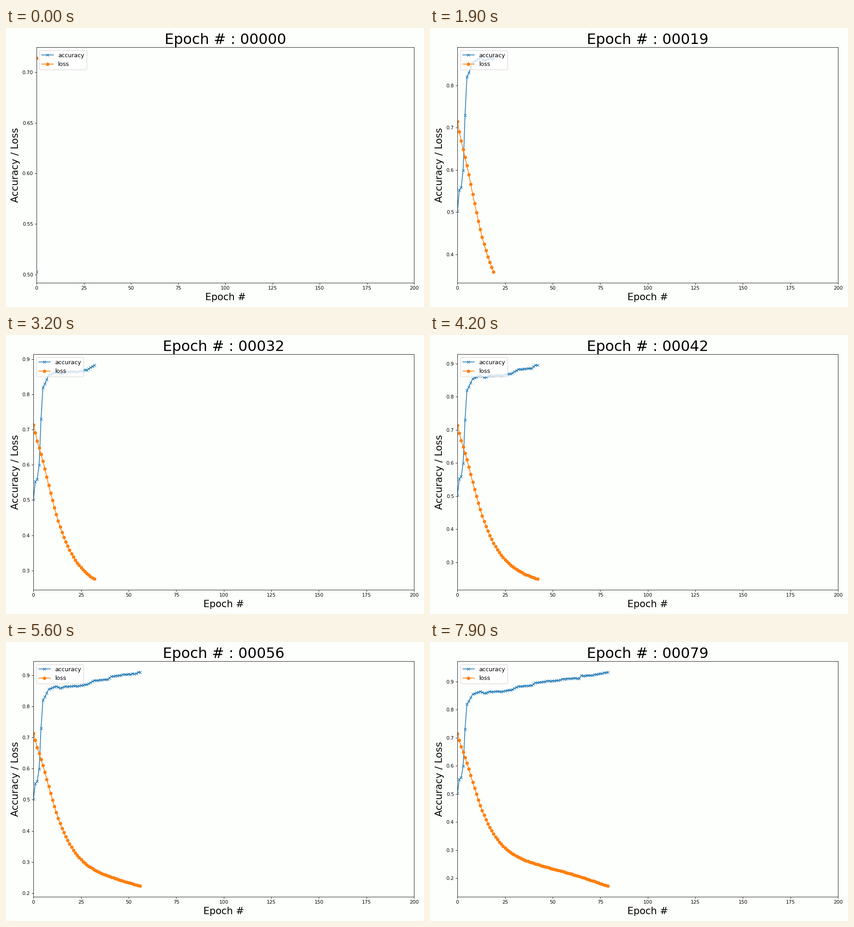
Animation, 917 px wide and 611 px high, one loop 8 s. Source, as a matplotlib script:

```python
import numpy as np
import matplotlib.pyplot as plt
from matplotlib.animation import FuncAnimation

W, H = 917, 611
DPI = W / 12
EPOCHS = 80
PAPER = "#fdfffc"


def smooth(x, points):
    """Cubic Hermite curve through the key points."""
    px, py = np.array(points).T
    slope = np.gradient(py, px)
    i = np.clip(np.searchsorted(px, x, side="right") - 1, 0, len(px) - 2)
    width = px[i + 1] - px[i]
    t = (x - px[i]) / width
    ease = t * t * (3 - 2 * t)
    bend = t * (1 - t) * ((1 - t) * slope[i] - t * slope[i + 1])
    return py[i] + ease * (py[i + 1] - py[i]) + width * bend


def jagged(x, points, noise, start):
    """Straight segments between key points, with jitter after start."""
    rng = np.random.default_rng(4)
    jitter = rng.uniform(-noise, noise, len(x))
    px, py = np.array(points).T
    return np.interp(x, px, py) + np.where(x > start, jitter, 0)


epochs = np.arange(EPOCHS)
loss = smooth(epochs, [
    (0, .714), (2, .6685), (5, .6103), (9, .5207), (13, .441), (19, .358),
    (25, .308), (32, .2755), (42, .2494), (56, .2228), (67, .2), (79, .1723),
])
accuracy = jagged(epochs, [
    (0, .5023), (1, .5525), (2, .5587), (3, .599), (4, .73), (5, .82),
    (6, .83), (8, .855), (12, .865), (14, .858), (17, .864), (23, .865),
    (28, .87), (32, .8827), (39, .8865), (41, .8955), (45, .9), (54, .905),
    (55, .91), (64, .912), (65, .921), (69, .921), (79, .9335),
], noise=.001, start=12)

plt.rcParams["font.family"] = "DejaVu Sans"
fig, ax = plt.subplots(figsize=(12, H / DPI), dpi=DPI, facecolor=PAPER)
ax.set_facecolor(PAPER)
acc_line, = ax.plot([], [], color="#1f77b4", marker="x", label="accuracy")
loss_line, = ax.plot([], [], color="#ff7f0e", marker="o", label="loss")
ax.set_xlim(0, 200)
ax.set_xlabel("Epoch #", fontsize=20)
ax.set_ylabel("Accuracy / Loss", fontsize=20)
title = ax.set_title("", fontsize=30)
ax.legend(loc="upper left", fontsize=12)


def update(n):
    shown = slice(0, n + 1)
    acc_line.set_data(epochs[shown], accuracy[shown])
    loss_line.set_data(epochs[shown], loss[shown])

    values = np.concatenate([accuracy[shown], loss[shown]])
    low, high = values.min(), values.max()
    margin = 0.05 * (high - low)
    ax.set_ylim(low - margin, high + margin)

    title.set_text(f"Epoch # : {n:05d}")
    fig.tight_layout()  # the left margin follows the tick label width
    return acc_line, loss_line, title


anim = FuncAnimation(fig, update, frames=EPOCHS, interval=100,
                     repeat=True, repeat_delay=0, blit=False)
plt.show()
```
